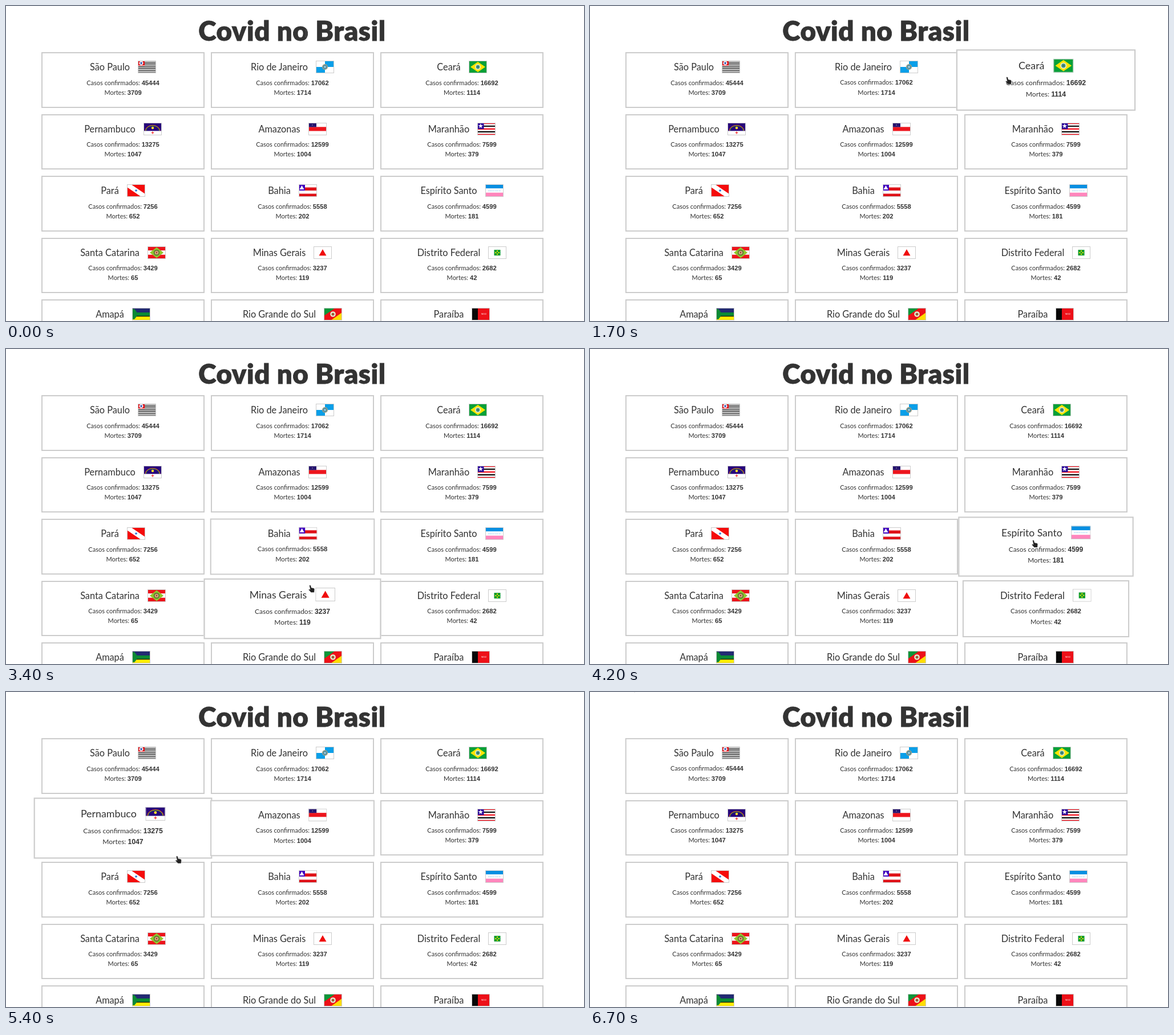
An HTML page that plays this animation: 1013x553 px, repeating every 7 s.

```html
<!DOCTYPE html>
<html lang="pt-BR">
<head>
<meta charset="utf-8">
<title>Covid no Brasil</title>
<style>
  html, body { margin: 0; width: 100%; height: 100%; overflow: hidden; background: #fff; }
  #stage { position: absolute; left: 0; top: 0; width: 1013px; height: 553px; overflow: hidden;
           font-family: Lato, sans-serif; color: #333; }
  h1 { position: absolute; left: 0; top: 16px; width: 1003px; margin: 0; text-align: center;
       font-size: 47.5px; line-height: 54px; font-weight: 900; letter-spacing: .6px;
       -webkit-text-stroke: .8px #333; }
  .card { position: absolute; box-sizing: border-box; padding-top: 13px;
          border: 2px solid #ccc; background: #fff; text-align: center; }
  h2 { display: flex; justify-content: center; gap: 14px; margin: 0 0 7.4px; height: 22px;
       font-size: 16.3px; line-height: 21px; font-weight: 400; }
  p { margin: 0; font-size: 11px; line-height: 17.3px; }
  b { font: bold 11.2px/0 "Liberation Sans", Arial, sans-serif; }
  #cursor { position: absolute; left: 0; top: 0; z-index: 2; overflow: visible; }
</style>
</head>
<body>
<div id="stage">
  <h1>Covid no Brasil</h1>
  <svg id="cursor" width="14" height="16" stroke-linejoin="round">
    <path id="beam" d="M1 1H2.3L3 1.6L3.7 1H5M3 1.6V12.4M1 13H2.3L3 12.4L3.7 13H5" fill="none" stroke="#555"/>
    <path id="arrow" d="M1 0V12L4 9.4L6 13L7.6 12.2L5.8 8.8L9.4 8.6Z" fill="#222" stroke="#fff" stroke-width=".6"/>
    <path id="hand" d="M2.4 .5Q4 0 4.5 2L5.2 5L9.2 5.8Q11 6.3 10.8 8.5L10.2 13.5H4.6L.5 9Q0 7.5 1.6 7.4L3 8.3L1.7 2Q1.5 .9 2.4 .5Z" fill="#222" stroke="#fff" stroke-width=".5"/>
  </svg>
</div>
<script>
const LOOP = 7000, STEP = 100, GROW = 300, SCALE = .1;
const CARD = { left: 62, top: 81.2, width: 286, height: 97.7, pitchX: 297, pitchY: 108.5 };
const stage = document.getElementById('stage');
const cursor = document.getElementById('cursor');

// Flag drawing helpers, on a 32 x 22 field
const box = (x, y, w, h, fill) => `<rect x="${x}" y="${y}" width="${w}" height="${h}" fill="${fill}"/>`;
const field = fill => box(0, 0, 32, 22, fill);
const disc = (r, fill, x = 16, y = 11) => `<circle cx="${x}" cy="${y}" r="${r}" fill="${fill}"/>`;
const shape = (points, fill) => `<polygon points="${points}" fill="${fill}"/>`;
const diamond = (w, h, fill) => shape(`16,${11 - h} ${16 + w},11 16,${11 + h} ${16 - w},11`, fill);
const stripes = (count, ...colors) => Array.from({ length: count }, (_, i) =>
  box(0, i * 22 / count, 32, 22 / count, colors[i % colors.length])).join('');
const star = (r, fill, x = 16, y = 11) => shape(Array.from({ length: 10 }, (_, i) => {
  const a = i * Math.PI / 5, d = i % 2 ? r * .4 : r;
  return `${x + d * Math.sin(a)},${y - d * Math.cos(a)}`;
}).join(' '), fill);
const cross = (size, thick, fill, x = 16, y = 11) =>
  box(x - size / 2, y - thick / 2, size, thick, fill) + box(x - thick / 2, y - size / 2, thick, size, fill);
const arc = (r, color) =>
  `<path d="M${16 - r} 14A${r} ${r * .75} 0 0 1 ${16 + r} 14" fill="none" stroke="${color}" stroke-width=".7"/>`;
const motto = (words, size, fill, x = 16) =>
  `<text x="${x}" y="12" text-anchor="middle" font-size="${size}" fill="${fill}">${words}</text>`;

const states = [
  { name: 'São Paulo', cases: 45444, deaths: 3709,
    flag: stripes(13, '#111', '#fff') + box(0, 0, 12, 8.5, '#e30f17') + disc(3.5, '#fff', 6, 4.2) + star(3, '#2546a8', 6, 4.2) },
  { name: 'Rio de Janeiro', cases: 17062, deaths: 1714,
    flag: field('#fff') + box(16, 0, 16, 11, '#0a9fe8') + box(0, 11, 16, 11, '#0a9fe8') +
      disc(5, '#9a9d87') + disc(3.2, '#3c8fae') + star(2.5, '#ddd') },
  { name: 'Ceará', cases: 16692, deaths: 1114,
    flag: field('#08a038') + diamond(13, 9, '#ffe500') + disc(4.8, '#e9f3ed') + disc(3.4, '#4b9878') + star(2, '#285c82') },
  { name: 'Pernambuco', cases: 13275, deaths: 1047,
    flag: field('#fff') + box(0, 0, 32, 14.3, '#27067c') + arc(13, '#e32626') + arc(12.2, '#ffe000') + arc(11.4, '#178f36') +
      disc(2.2, '#ffe52b', 16, 9) + cross(4.5, 1, '#e11', 16, 17.5) },
  { name: 'Amazonas', cases: 12599, deaths: 1004,
    flag: stripes(3, '#fff', '#ed151d') + box(0, 0, 14, 7.5, '#25136f') + star(1.2, '#aaa', 7, 4) },
  { name: 'Maranhão', cases: 7599, deaths: 379,
    flag: stripes(9, '#f31320', '#fff', '#111', '#fff') + box(0, 0, 11.5, 11, '#2c079b') + star(4.5, '#fff', 5.8, 5.7) },
  { name: 'Pará', cases: 7256, deaths: 652,
    flag: field('#f50b0b') + shape('0,0 7,0 32,17 32,22 25,22 0,5', '#fff') + star(2.8, '#126ad4') },
  { name: 'Bahia', cases: 5558, deaths: 202,
    flag: stripes(4, '#fff', '#df1118') + box(0, 0, 11, 11, '#4000c0') + shape('5.5,2 9.5,9 1.5,9', '#fff') },
  { name: 'Espírito Santo', cases: 4599, deaths: 181,
    flag: stripes(3, '#078fe2', '#fff', '#ff86bd') + motto('TRABALHA E CONFIA', 2.3, '#078fe2') },
  { name: 'Santa Catarina', cases: 3429, deaths: 65,
    flag: stripes(3, '#ed141c', '#fff') + diamond(12, 9.5, '#8fc72d') + disc(5.2, '#577332') + disc(3.6, '#c69e62') +
      star(3, '#edf0d2') + disc(1.4, '#a8282c') },
  { name: 'Minas Gerais', cases: 3237, deaths: 119,
    flag: field('#fff') + shape('16,5 22.5,16.2 9.5,16.2', '#f00d0d') },
  { name: 'Distrito Federal', cases: 2682, deaths: 42,
    flag: field('#fff') + box(10.5, 6, 11, 10, '#0a9b2d') + cross(8, 1.7, '#ffe500') + diamond(2, 2, '#0a9b2d') },
  { name: 'Amapá',
    flag: field('#0b8a34') + box(0, 0, 32, 8, '#222a72') + box(0, 14, 32, 8, '#ffec00') + box(0, 14, 32, 1.2, '#111') +
      shape('0,2 4,2 8,7 8,15 4,20 0,20', '#0b8a34') },
  { name: 'Rio Grande do Sul',
    flag: field('#ed1118') + shape('0,0 20,0 0,14', '#0d9639') + shape('32,8 32,22 12,22', '#ffdc00') +
      disc(4.8, '#f0e9d2') + disc(2.6, '#7f8a52') + star(2.2, '#c72725') },
  { name: 'Paraíba',
    flag: field('#ed1018') + box(0, 0, 11, 22, '#080808') + motto('NEGO', 3.2, '#fff', 21.5) }
];

const corner = i => [CARD.left + CARD.pitchX * (i % 3), CARD.top + CARD.pitchY * Math.floor(i / 3)];

const cards = states.map(({ name, cases, deaths, flag }, i) => {
  const card = document.createElement('div');
  const [left, top] = corner(i);
  card.className = 'card';
  card.style.cssText = `left:${left}px;top:${top}px;width:${CARD.width}px;height:${CARD.height}px`;
  card.innerHTML = `<h2>${name}<svg width="32" height="22">${flag}
    <rect x=".5" y=".5" width="31" height="21" fill="none" stroke="#ccc"/></svg></h2>` +
    (cases ? `<p>Casos confirmados: <b>${cases}</b></p><p>Mortes: <b>${deaths}</b></p>` : '');
  stage.insertBefore(card, cursor);
  return card;
});

// Pointer moves: leave at, arrive at, x, y
const start = [523, 41];
const moves = [
  [500, 1100, 548, 128], [1250, 1570, 728, 124], [1800, 2150, 722, 200], [2150, 2600, 528, 231],
  [2600, 2700, 528, 398], [3190, 3250, 530, 414], [3650, 3980, 740, 425], [3980, 4200, 774, 335],
  [4400, 5000, 353, 249], [5050, 5780, 233, 331], [5950, 6700, 72, -12.5]
];
const clamp = v => Math.min(1, Math.max(0, v));
const smooth = v => v * v * (3 - 2 * v);

function pointer(t) {
  let [x, y] = start;
  for (const [leave, arrive, toX, toY] of moves) {
    const k = smooth(clamp((t - leave) / (arrive - leave)));
    x += (toX - x) * k;
    y += (toY - y) * k;
  }
  return [x, y];
}

// A hovered card is larger, so it keeps the pointer a little longer
function isOver(i, x, y, grown) {
  const [left, top] = corner(i);
  const padX = grown ? CARD.width * SCALE / 2 : 0, padY = grown ? CARD.height * SCALE / 2 : 0;
  return x >= left - padX && x <= left + CARD.width + padX &&
    y >= top - padY && y <= top + CARD.height + padY;
}

// Follow the pointer once through the loop to learn when each card is hovered
const hovers = [];
let current = null;
for (let t = 0; t < LOOP; t += 4) {
  const [x, y] = pointer(t), tip = x + 3;
  if (current && isOver(current.card, tip, y, true)) continue;
  if (current) current.leave = t;
  const card = cards.findIndex((_, i) => isOver(i, tip, y, false));
  current = card < 0 ? null : { card, enter: t, leave: LOOP };
  if (current) hovers.push(current);
}

// The CSS "ease" curve, solved by bisection
function ease(p) {
  if (p <= 0 || p >= 1) return clamp(p);
  const bezier = (a, b, u) => 3 * a * u * (1 - u) ** 2 + 3 * b * u * u * (1 - u) + u ** 3;
  let low = 0, high = 1;
  for (let i = 0; i < 20; i++) {
    const mid = (low + high) / 2;
    if (bezier(.25, .25, mid) < p) low = mid; else high = mid;
  }
  return bezier(.1, 1, low);
}

function draw(now) {
  const t = Math.floor((now % LOOP) / STEP) * STEP;
  const growth = cards.map(() => 0);
  for (const { card, enter, leave } of hovers)
    growth[card] += ease((t - enter) / GROW) - ease((t - leave) / GROW);
  cards.forEach((card, i) => {
    const active = growth[i] > .0001;
    card.style.transform = active ? `scale(${1 + SCALE * growth[i]})` : 'none';
    card.style.zIndex = active ? 1 : 0;
  });

  const [x, y] = pointer(t);
  const overCard = hovers.some(h => t >= h.enter && t < h.leave);
  const overTitle = x > 337 && y < 62;
  const kind = overCard ? 'hand' : overTitle ? 'beam' : 'arrow';
  for (const form of cursor.children) form.style.display = form.id === kind ? '' : 'none';
  cursor.style.transform = `translate(${x}px, ${y}px)`;
  requestAnimationFrame(draw);
}
draw(0);
</script>
</body>
</html>
```
